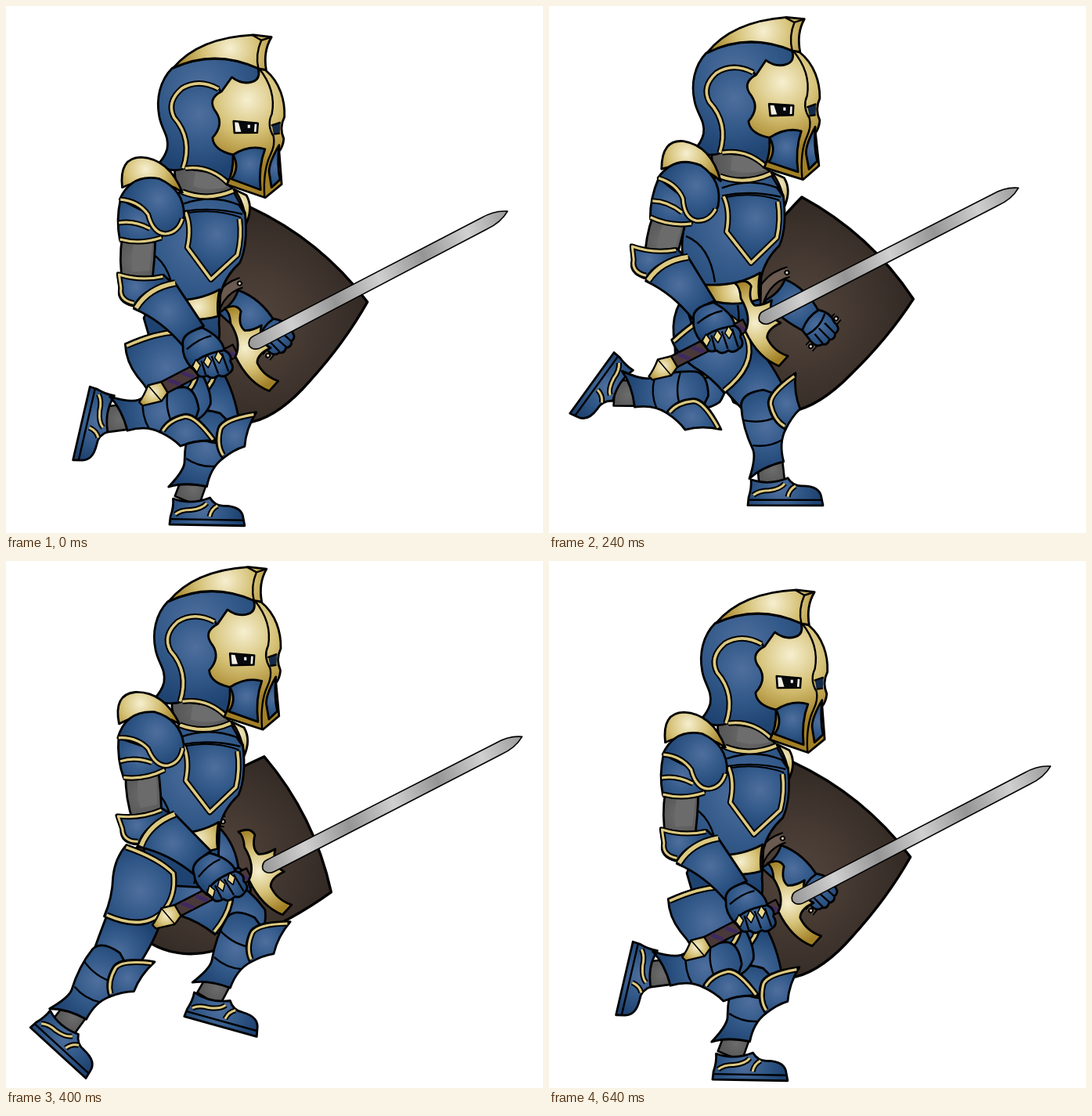
An HTML page with a canvas that plays this animation: 686x673 px, repeating every 680 ms.

```html
<!DOCTYPE html>
<html lang="en">
<head>
<meta charset="utf-8">
<title>Running knight</title>
<style>
html, body { margin: 0; width: 100%; height: 100%; overflow: hidden; background: #fff; }
canvas { display: block; }
</style>
</head>
<body>
<canvas id="stage" width="686" height="673"></canvas>
<script>
const ctx = document.getElementById('stage').getContext('2d');
const STEP = 40, LOOP = 680, CYCLE = 16;

const TONES = {
  blue: ['#4f6f9e', '#325989', '#1f4371'],
  gold: ['#f6efd0', '#d5c176', '#a28026'],
  brown: ['#53453d', '#41362f', '#2d2420'],
  grey: ['#6c6c6c', '#5c5c5c', '#505050']
};

// Mean plus harmonics of the run cycle, each given as [cosine, sine] amplitudes.
function wave(at, mean, ...harmonics) {
  const angle = at / CYCLE * 2 * Math.PI;
  return harmonics.reduce((sum, [c, s], i) =>
    sum + c * Math.cos((i + 1) * angle) + s * Math.sin((i + 1) * angle), mean);
}

const bodyPose = at => [
  wave(at, 260.5, [.5, -1.5], [0, 0], [0, 0], [.8, 0]),
  wave(at, 331.7, [2, 0], [15.5, -3.7], [0, 0], [2.9, 0]),
  wave(at, -1.6, [0, 0], [1.3, .4])
];
const upperArmAngle = at => wave(at, 3.4, [0, 13.6], [-1.5, 0]);
const handPose = (at, bodyY) => [
  wave(at, 244, [-2, -45.5], [5, -1], [6, 2], [4.5, 0]),
  wave(at, bodyY + 94.6, [6, 2], [5.8, -1.5], [-2.5, -3.7], [-2, 0]),
  wave(at, 0, [2, 11], [1.5, 0], [-2, -2])
];
const swordAngle = at => wave(at, -25.7, [1, 0], [-1.8, 0], [-1, 0]);
const shieldPose = (at, bodyY) => [
  wave(at, 325, [-5, -13.4], [-5.5, -6], [-3, 0]),
  wave(at, bodyY - 79, [-2.7, -20.6], [-8.8, -8], [-4.8, 0]),
  wave(at, 51, [-4.5, -21], [-6, -3], [-1.6, 1.7])
];
const legPose = at => ({
  kneeX: wave(at, 19.5, [4.5, 91.6], [12, -5.5], [-12.5, 0], [4, 0]),
  kneeY: wave(at, 106, [-13, -8], [5, -2], [3, -5]),
  shin: wave(at, 40, [31.5, -35], [14, -5], [0, -2]),
  foot: wave(at, 46, [43, -50], [6, -17], [8, -4])
});

function place(x, y, degrees, draw, px = 0, py = 0) {
  ctx.save();
  ctx.translate(x, y);
  ctx.rotate(degrees * Math.PI / 180);
  ctx.translate(-px, -py);
  draw();
  ctx.restore();
}

function line(d, width = 2.4, color = '#000') {
  ctx.lineWidth = width;
  ctx.strokeStyle = color;
  ctx.stroke(new Path2D(d));
}

function flat(d, color) {
  ctx.fillStyle = color;
  ctx.fill(new Path2D(d));
}

function plate(d, tone, cx, cy, r, width = 2.8) {
  const g = ctx.createRadialGradient(cx, cy, 0, cx, cy, r);
  TONES[tone].forEach((c, i) => g.addColorStop(i / 2, c));
  flat(d, g);
  line(d, width);
}

function trim(d, width = 3.6) {
  line(d, width + 4);
  line(d, width, '#dcc981');
}

function drawShield() {
  plate('M0,0 Q96,-24 193,0 Q203,60 199,125 Q197,182 175,211 Q155,240 112,252 Q75,236 32,197 Q-4,130 0,0Z', 'brown', 95, 110, 170, 3.4);
  plate('M55,92 Q85,82 117,94 L120,124 Q85,134 54,130 Q62,110 55,92Z', 'blue', 85, 106, 45);
  const strap = 'M57,150 Q32,112 52,82';
  line(strap, 15);
  line(strap, 10.5, '#6a5a50');
  const handle = 'M137,82 V136';
  line(handle, 13);
  line(handle, 9, '#75665b');
  for (const [x, y] of [[51, 84], [137, 85], [137, 133]]) {
    ctx.beginPath();
    ctx.arc(x, y, 2.6, 0, 7);
    ctx.fillStyle = '#d8d0c0';
    ctx.fill();
    ctx.lineWidth = 2;
    ctx.strokeStyle = '#000';
    ctx.stroke();
  }
  plate('M113,92 Q126,84 138,90 Q151,90 149,100 Q154,105 149,111 Q152,118 146,121 Q144,130 132,128 L115,125 Q108,108 113,92Z', 'blue', 125, 108, 32);
  line('M148,100 L130,99 M149,110 L129,109 M146,120 L130,118 M122,90 Q130,108 123,126');
}

function drawThigh(length) {
  plate(`M-37,72 Q-34,100 -28,${length} Q6,${length + 30} 30,${length} Q36,90 28,58Z`, 'blue', 0, length - 12, 52);
  plate('M-55,2 Q-10,-5 17,4 Q35,30 28,56 Q18,93 -37,96 Q-39,70 -51,46 Q-60,24 -55,2Z', 'blue', -12, 45, 68);
  trim('M-54,5 Q-10,-2 15,6 Q32,30 26,55 Q16,89 -35,93');
}

function drawShin() {
  plate('M-30,4 Q-28,-12 0,-14 L24,-4 Q14,20 25,38 Q15,55 20,79 Q-8,84 -25,98 Q-15,72 -18,62 Q-30,32 -30,4Z', 'blue', 0, 32, 60);
  line('M-29,23 Q-4,30 18,20 M-18,56 Q2,60 20,51');
  plate('M42,-33 Q2,-10 5,6 Q8,28 25,38 Q34,22 45,13 Q38,-8 42,-33Z', 'blue', 28, 5, 42);
  trim('M40,-29 Q7,-8 8,5 Q11,25 24,34', 3.2);
}

function drawFoot() {
  plate('M-27,17 Q-4,25 20,15 Q27,26 39,25 Q61,25 63,40 L65,50 L-31,50 L-30,40 Q-26,28 -27,17Z', 'blue', 10, 30, 50);
  trim('M-24,37 Q-17,31 -4,31 Q11,29 16,22', 3);
  trim('M20,39 Q22,29 30,25', 3);
  line('M-30,43 L64,43');
}

function drawLeg(at, hipX, hipY) {
  const { kneeX, kneeY, shin, foot } = legPose(at);
  const onKnee = draw => place(hipX + kneeX, hipY + kneeY, shin, draw);
  onKnee(() => {
    plate('M-14,68 L18,68 L20,106 L-13,106Z', 'grey', 5, 88, 30, 2.6);
    place(5, 84, foot - shin, drawFoot);
  });
  place(hipX, hipY, Math.atan2(-kneeX, kneeY) * 180 / Math.PI,
    () => drawThigh(Math.hypot(kneeX, kneeY)));
  onKnee(drawShin);
}

function drawTorso() {
  plate('M292,234 L308,242 Q317,258 307,279 Q306,252 292,234Z', 'gold', 300, 250, 30);
  plate('M222,238 Q255,252 292,238 L306,264 Q310,305 299,328 Q280,345 274,368 L272,405 Q275,435 262,446 L188,440 L176,398 L188,370 Q158,335 195,250Z', 'blue', 250, 300, 120);
  line('M228,252 Q264,240 298,254 L306,266 M228,262 Q265,256 303,266 M180,312 Q210,325 215,372');
  plate('M232,264 Q268,258 300,270 Q304,300 297,318 L262,350 L233,308 Q239,280 232,264Z', 'blue', 270, 292, 56, 2);
  trim('M230,263 Q238,282 232,308 L262,349 L296,318 Q302,295 299,272');
  plate('M196,374 Q240,380 273,362 Q269,380 271,396 Q240,404 215,397 Q204,388 196,374Z', 'gold', 245, 384, 42);
  line('M243,402 Q246,422 240,440');
  plate('M217,205 Q255,198 293,236 Q255,252 227,239 Q214,224 217,205Z', 'grey', 255, 220, 50);
  flat('M243,212 Q270,213 284,231 Q264,237 240,230Z', '#6d6d6d');
  trim('M226,237 Q258,250 291,236', 4);
}

function drawHead() {
  plate('M214,79 C198,95 193,118 197,140 C200,158 210,165 207,182 Q204,193 194,203 Q212,213 230,207 L282,215 L330,130 L324,80 Q270,55 214,79Z', 'blue', 250, 105, 105);
  plate('M274,106 Q250,93 226,106 Q208,125 218,143 Q237,165 230,206 Q262,204 287,224 Q300,205 290,186 L285,130Z', 'blue', 248, 138, 78);
  trim('M273,106 Q248,92 226,105 Q206,122 216,142 Q240,170 227,207');
  trim('M230,207 Q262,203 285,227', 3.2);
  plate('M333,82 C352,98 358,122 357,142 Q350,156 356,170 Q355,180 350,186 L353,228 L332,245 L283,228 Q292,212 291,190 Q266,184 265,168 Q280,152 270,136 Q257,119 277,109 L290,91 Q303,101 316,97 Q327,94 324,80Z', 'gold', 310, 120, 85);
  plate('M291,190 Q312,177 332,183 Q323,206 326,235 L289,221 Q300,206 291,190Z', 'blue', 312, 202, 34);
  plate('M350,178 Q337,200 337,212 L340,232 L351,222 Q347,205 350,178Z', 'blue', 346, 205, 30);
  line('M325,80 Q347,108 341,138 Q334,152 343,167 Q345,178 339,190 Q329,210 331,244');
  plate('M215,79 Q248,40 318,37 L341,40 Q330,58 334,82 L324,80 Q268,54 215,79Z', 'gold', 288, 54, 70);
  line('M316,37 L328,44 Q320,62 324,80 M328,44 L341,40');
  const eye = 'M292,147 L323,150 L322,162 L293,162Z';
  flat(eye, '#f4efe4');
  flat('M298,148 L319,150 L318,162 L302,162Z', '#07090d');
  flat('M310,152 h3 v4 h-3Z', '#fff');
  line(eye, 2.6);
  flat('M341,153 L352,149 L351,163 L343,164Z', '#152b49');
  line('M340,153 L352,149 M343,164 L351,163');
}

function drawSword() {
  flat('M-126,-11 H-20 V5 H-126Z', '#4a3939');
  line('M-126,-11 H-20 V5 H-126Z');
  for (let x = -114; x < -30; x += 20) line(`M${x},-9 L${x + 11},3`, 5, '#3f2a60');
  plate('M-123,-11 L-140,-15 Q-150,-6 -160,-1 L-158,5 L-134,11 L-122,5Z', 'gold', -138, -4, 24, 2.4);
  line('M-140,-15 L-134,11', 1.6);
  plate('M-8,-57 Q9,-56 9,-44 Q-3,-30 2,-20 Q10,-15 24,-16 Q10,0 21,15 Q2,14 -3,24 Q-4,42 10,57 L-6,63 Q-25,42 -24,4 Q-8,-8 -10,-36 Q-4,-50 -8,-57Z', 'gold', -8, 0, 55);
  const blade = 'M-2,0 Q0,-9 10,-8.5 L336,-8 Q356,-9 370,0 Q356,9 336,8 L10,9 Q0,9 -2,0Z';
  const steel = ctx.createLinearGradient(0, -30, 370, 30);
  for (let i = 0; i <= 6; i++) steel.addColorStop(i / 6, i % 2 ? '#d0d0d0' : '#959595');
  flat(blade, steel);
  line(blade, 1.6);
}

function drawPauldron() {
  plate('M149,232 Q144,194 172,193 Q208,194 226,237 Q190,213 149,232Z', 'gold', 178, 208, 48);
}

function drawUpperArm() {
  plate('M151,295 L193,292 Q194,325 190,358 L154,358 Q147,325 151,295Z', 'grey', 172, 325, 45);
  flat('M166,302 Q162,322 165,340 L187,338 L190,303Z', '#6b6b6b');
  plate('M147,248 Q142,275 148,300 Q175,306 201,296 L205,275Z', 'blue', 172, 275, 42);
  trim('M146,278 Q165,274 186,284', 3.2);
  trim('M148,299 Q175,305 201,295', 3.2);
  plate('M146,248 Q160,214 196,220 Q228,233 229,266 Q224,293 204,291 Q190,287 183,268 Q168,250 146,248Z', 'blue', 196, 246, 50);
  trim('M147,248 Q170,249 183,266 Q190,290 206,290 Q222,288 227,270', 3.2);
}

function drawForearm() {
  plate('M140,343 Q170,351 199,344 L210,354 Q172,362 162,385 Q139,380 143,362Z', 'blue', 164, 360, 38);
  trim('M162,381 Q143,378 145,362 L142,345 Q170,353 198,346', 3);
  plate('M162,388 Q176,360 214,354 L252,408 Q233,415 226,434 Q198,402 162,388Z', 'blue', 205, 390, 50);
  trim('M165,387 Q180,361 214,354', 5.5);
  plate('M226,434 Q222,418 250,410 Q276,422 279,438 L238,462 Q225,448 226,434Z', 'blue', 252, 427, 34);
  plate('M238,461 Q244,445 279,438 Q290,444 287,452 Q294,462 286,467 Q279,474 273,470 Q264,477 258,471 Q248,475 245,469Z', 'blue', 264, 452, 28);
  line('M250,452 L256,470 M263,446 L272,468 M276,442 L285,465 M231,438 Q246,424 262,420');
  for (let i = -1; i <= 1; i++) {
    const diamond = `M${257 + 14 * i},${445 - 6 * i} l6,7 l-4,9 l-6,-7Z`;
    flat(diamond, '#e9d88f');
    line(diamond, 1.6);
  }
}

function drawKnight(at) {
  const [bx, by, tilt] = bodyPose(at);
  const [hx, hy, forearm] = handPose(at, by);
  const arm = upperArmAngle(at);
  const onBody = draw => place(bx, by, tilt, draw, 262, 352);
  const onShoulder = (angle, draw) =>
    onBody(() => place(190, 245, angle - tilt, draw, 190, 245));
  place(...shieldPose(at, by), drawShield);
  drawLeg(at + CYCLE / 2, bx - 37, by + 60);
  onBody(drawTorso);
  drawLeg(at, bx - 57, by + 63);
  onBody(drawHead);
  onShoulder(arm * .6, drawPauldron);
  place(hx + 55, hy - 21, swordAngle(at), drawSword);
  onShoulder(arm, drawUpperArm);
  place(hx, hy, forearm, drawForearm, 258, 453);
}

function render(time) {
  const step = Math.floor((time % LOOP) / STEP) % CYCLE;
  ctx.fillStyle = '#fff';
  ctx.fillRect(0, 0, 686, 673);
  ctx.lineJoin = 'round';
  drawKnight(step);
  requestAnimationFrame(render);
}
render(0);
</script>
</body>
</html>
```
